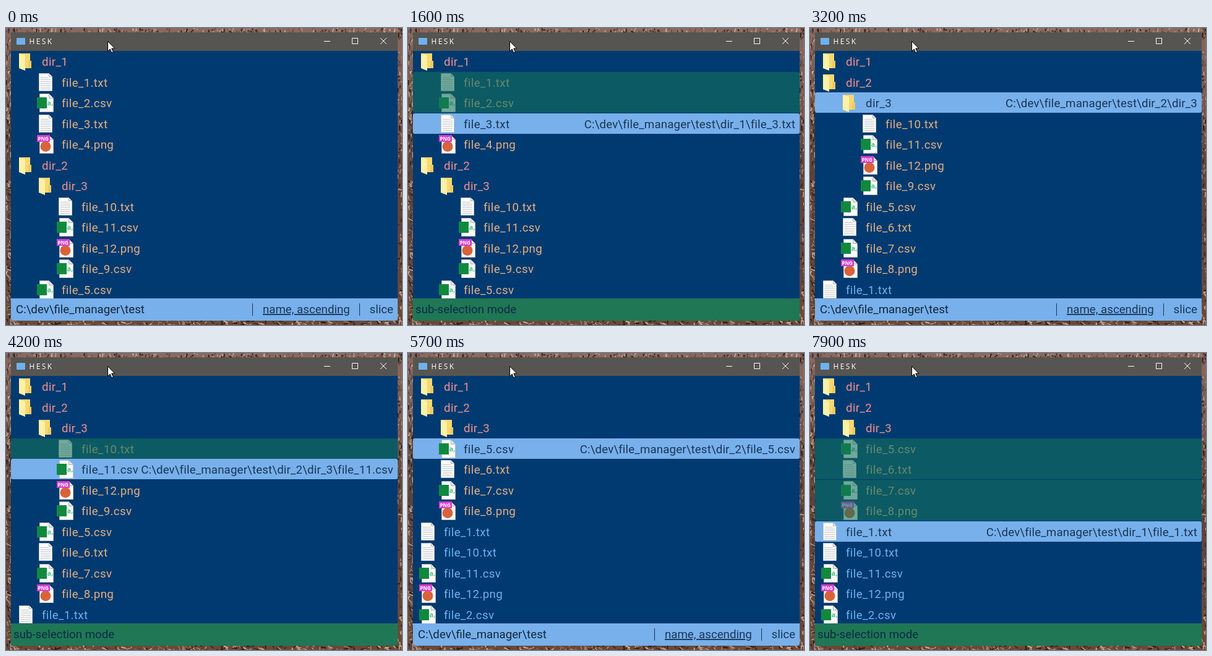
An HTML page that plays this animation: 640 by 480 pixels, repeating every 8 s.

```html
<!DOCTYPE html>
<html lang="en">
<head>
<meta charset="utf-8">
<title>File manager</title>
<style>
  html, body { margin: 0; width: 100%; height: 100%; overflow: hidden; background: #4a352b; }
  svg { display: block; width: 640px; height: 480px; }
  text { font: 18.7px Roboto, sans-serif; white-space: pre; }
  .name { letter-spacing: .35px; }
  .path { letter-spacing: .15px; text-anchor: end; }
  .title { font: 12px "Open Sans", sans-serif; letter-spacing: 2.4px; }
  .tag { font: bold 8px "Open Sans", sans-serif; }
  .cell { font: bold 11px "Open Sans", sans-serif; }
</style>
</head>
<body>
<svg viewBox="0 0 640 480">
  <defs>
    <linearGradient id="bark" x2="0" y2="1">
      <stop offset="0" stop-color="#8a6a60"/>
      <stop offset=".5" stop-color="#5d4237"/>
      <stop offset="1" stop-color="#6b4a38"/>
    </linearGradient>
    <g id="folder">
      <path d="M6 4h17v24H6z" fill="#f6d873"/>
      <path d="M20 16h5v12h-5z" fill="#efcb62"/>
      <path d="M5 4l10 3v25L5 28z" fill="#fff0a6"/>
    </g>
    <path id="page" d="M5.5 2.5h15l7 7v22h-22z" fill="#fdfdfd" stroke="#b9bcc0"/>
    <path id="fold" d="M20.5 2.5v7h7" fill="#e4e6e8" stroke="#b0b3b7"/>
    <g id="txt">
      <path d="M5.5 2.5h16l5 5v23h-21z" fill="#fdfdfd" stroke="#c3c5c8"/>
      <path d="M21.5 2.5v5h5" fill="#e4e6e8" stroke="#b0b3b7"/>
      <path d="M8 9.5h13M8 12.5h16M8 15.5h16M8 18.5h16M8 21.5h16M8 24.5h16M8 27.5h16" stroke="#c2c5c9"/>
    </g>
    <g id="csv">
      <use href="#page" x="1"/><use href="#fold" x="1"/>
      <path d="M2 8h16v18H2z" fill="#10893e"/>
      <text class="cell" x="18.5" y="21" fill="#4cc08a">a,</text>
    </g>
    <g id="png">
      <use href="#page" x="1"/><use href="#fold" x="1"/>
      <circle cx="16" cy="20.5" r="8.5" fill="#d8633a"/>
      <path d="M2 2h21v11H2z" fill="#d63fd0"/>
      <text class="tag" x="3.5" y="10.5" fill="#fff">PNG</text>
    </g>
  </defs>

  <rect width="640" height="480" fill="url(#bark)"/>
  <g id="streaks" stroke-linecap="round"></g>

  <path d="M8 37h625v432q0 4-4 4H12q-4 0-4-4z" fill="#003a70"/>
  <path d="M8 7h625v30H8z" fill="#565551"/>
  <rect x="17" y="16" width="14" height="11" rx="1" fill="#6fb1ec"/>
  <text class="title" x="37.5" y="25.5" fill="#fff">HESK</text>
  <path d="M514 21.5h10M559.5 16.5h9v9h-9zM605 16l10 10M615 16l-10 10" fill="none" stroke="#fff"/>

  <g id="rows"></g>
  <g id="status"></g>
  <path d="M164.5 21.5v16l3.7-3.5 2.6 6 2.5-1.1-2.6-5.9h5z" fill="#fff" stroke="#000"/>
</svg>

<script>
const LOOP = 8000, ROOT = 'C:\\dev\\file_manager\\test';
const SKY = '#77b0eb', DARK = '#1b3556', GREEN = '#1f7755';
const $ = id => document.getElementById(id);

// Each entry is a depth digit followed by the name.
const parse = list => list.split(' ').map(s => ({ depth: +s[0], name: s.slice(1) }));
const start = parse('0dir_1 1file_1.txt 1file_2.csv 1file_3.txt 1file_4.png 0dir_2 1dir_3 ' +
  '2file_10.txt 2file_11.csv 2file_12.png 2file_9.csv 1file_5.csv');
const firstMoved = parse('0dir_1 0dir_2 1dir_3 2file_10.txt 2file_11.csv 2file_12.png 2file_9.csv ' +
  '1file_5.csv 1file_6.txt 1file_7.csv 1file_8.png 0file_1.txt');
const secondMoved = parse('0dir_1 0dir_2 1dir_3 1file_5.csv 1file_6.txt 1file_7.csv 1file_8.png ' +
  '0file_1.txt 0file_10.txt 0file_11.csv 0file_12.png 0file_2.csv');

// time, list, highlighted row, first selected row (sub-selection mode)
const states = [
  [0, start, -1], [600, start, 0], [1000, start, 1],
  [1300, start, 2, 1], [1500, start, 3, 1], [1700, start, 4, 1], [1900, start, 5, 1],
  [2800, firstMoved, 1], [3100, firstMoved, 2], [3400, firstMoved, 3],
  [4100, firstMoved, 4, 3], [4300, firstMoved, 5, 3], [4500, firstMoved, 6, 3], [4800, firstMoved, 7, 3],
  [5700, secondMoved, 3],
  [6600, secondMoved, 4, 3], [6800, secondMoved, 5, 3], [7000, secondMoved, 6, 3], [7300, secondMoved, 7, 3],
];

const isDir = item => item.name.startsWith('dir');
const rowTop = i => Math.floor(37.5 + 33.5 * i);
const bar = (i, fill) => `<rect x="8" y="${rowTop(i)}" width="625" height="33" rx="3" fill="${fill}"/>`;
const label = (x, y, fill, text, attrs = '') => `<text x="${x}" y="${y}" fill="${fill}" ${attrs}>${text}</text>`;

function drawRows(list, current, from) {
  const parents = [];
  return list.map((item, i) => {
    const { depth, name } = item, y = rowTop(i), x = 16 + 32 * depth;
    const parent = depth ? parents[depth - 1] : ROOT + (isDir(item) ? '' : '\\dir_1');
    const path = parent + '\\' + name;
    if (isDir(item)) parents[depth] = path;
    const icon = isDir(item) ? 'folder' : name.slice(-3);
    const color = i === current ? DARK : isDir(item) ? '#ea9490' : depth ? '#dfb083' : '#6fb0ee';
    return (i === current ? bar(i, SKY) : '') +
      `<use href="#${icon}" x="${x}" y="${y}"/>` +
      label(x + 42, y + 23.5, color, name, 'class="name"') +
      (i === current ? label(626, y + 23.5, DARK, path, 'class="path"') : '') +
      (i >= from && i < current ? bar(i, 'rgba(20,113,92,.6)') : '');
  }).join('');
}

function drawStatus(selecting) {
  const strip = fill => `<path d="M8 437h625v32q0 4-4 4H12q-4 0-4-4z" fill="${fill}"/>`;
  if (selecting) return strip(GREEN) + label(12, 461, '#0f2a47', 'sub-selection mode');
  return strip(SKY) + label(16, 461, '#14263d', ROOT) +
    label(415, 461, DARK, 'name, ascending', 'text-decoration="underline"') +
    label(626, 461, DARK, 'slice', 'text-anchor="end"') +
    `<path d="M398.5 445v20M571.5 445v20" stroke="${DARK}"/>`;
}

function drawStreaks() {
  let seed = 7;
  const rnd = () => (seed = seed * 16807 % 2147483647) / 2147483647;
  const tones = ['#2a1a16', '#3c2822', '#8d6a58', '#b8937c', '#c9ac98', '#6d4636', '#54434a'];
  let out = '';
  for (let i = 0; i < 1100; i++) {
    const along = rnd(), across = rnd() * 8, side = i % 7;
    const [x, y] = side < 2 ? [along * 640, across] : side < 4 ? [along * 640, 473 + across]
      : side < 6 ? [across, along * 480] : [633 + across, along * 480];
    const lean = y < 240 ? 3 : 9;
    out += `<path d="M${x.toFixed(1)} ${y.toFixed(1)}l${(rnd() * lean - 2).toFixed(1)} ${(rnd() * 10 - 2).toFixed(1)}"
      stroke="${tones[Math.floor(rnd() * tones.length)]}" stroke-width="${(.8 + rnd() * 1.4).toFixed(1)}"/>`;
  }
  return out;
}

let shown;
function frame() {
  const t = performance.now() % LOOP;
  const state = states.findLast(s => s[0] <= t);
  if (state !== shown) {
    shown = state;
    const [, list, current, from] = state;
    $('rows').innerHTML = drawRows(list, current, from);
    $('status').innerHTML = drawStatus(from !== undefined);
  }
  requestAnimationFrame(frame);
}

$('streaks').innerHTML = drawStreaks();
frame();
</script>
</body>
</html>
```
